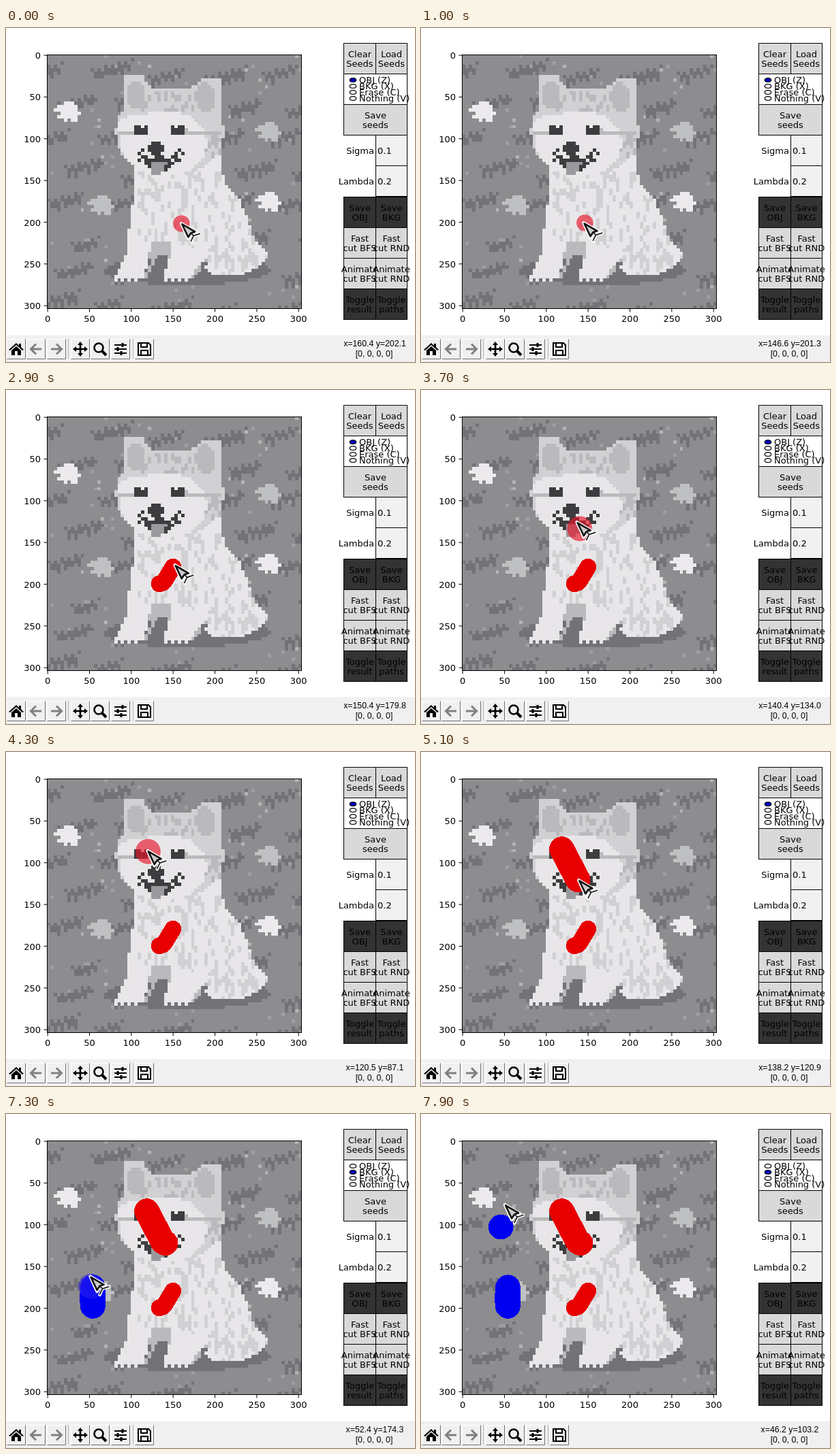
An HTML page for the animation above (8000 ms loop, 600 px wide and 491 px high).

```html
<!DOCTYPE html>
<html lang="en">
<head>
<meta charset="utf-8">
<title>Seed painting</title>
<style>
  html, body { margin: 0; width: 100%; height: 100%; overflow: hidden; background: #fff; }
  svg { display: block; }
  text { font: 13px "DejaVu Sans", sans-serif; }
  .status { font: 12.3px "Liberation Sans", Arial, sans-serif; text-anchor: middle; }
</style>
</head>
<body>
<svg width="600" height="491" viewBox="0 0 600 491">
  <g id="picture" shape-rendering="crispEdges"></g>
  <g id="strokes" fill="none" stroke-linecap="round" stroke-linejoin="round" shape-rendering="crispEdges"></g>
  <circle id="brush"/>
  <g id="axes"></g>
  <g id="panel"></g>
  <g id="toolbar"></g>
  <text class="status" id="coords" x="541" y="468"></text>
  <text class="status" x="540" y="483">[0, 0, 0, 0]</text>
  <g id="cursor" stroke-linejoin="round" stroke-linecap="round">
    <path d="M0 0L10 22L14 15L22 13ZM14 15L18 18L27 15M18 18L14 27" fill="#fff" stroke="#fff" stroke-width="4.6"/>
    <path d="M1 1L10 20L14 14L20 12Z" fill="#ccc" stroke="#111" stroke-width="2.6"/>
    <path d="M14 14L18 18L27 15M18 18L14 26" fill="none" stroke="#222" stroke-width="1.8"/>
  </g>
</svg>
<script>
const $ = id => document.getElementById(id);
const LEFT = 60.5, TOP = 39.5, SIZE = 373, SCALE = SIZE / 304, CELLS = 76, CELL = SIZE / CELLS;
const toX = x => LEFT + x * SCALE, toY = y => TOP + y * SCALE;
const random = n => { const v = Math.sin(n * 12.9898 + 4.1) * 43758.5453; return v - Math.floor(v); };

// ---- Pixel picture -------------------------------------------------------
const GROUND = '#8d8c8f', DARK = '#737276', LIGHT = '#e8e6e8', MID = '#d1d0d2', SHADE = '#bab9bc';
const TONES = { '#': '#3d3c3f', o: '#f7f6f7', t: '#9a999c', '+': SHADE };
const grid = Array.from({ length: CELLS }, () => Array(CELLS).fill(GROUND));

function put(c, r, color) {
  if (c >= 0 && r >= 0 && c < CELLS && r < CELLS) grid[r][c] = color;
}

// Paints each cell whose centre, in stage pixels, passes the test.
function fill(color, test, density = 1) {
  for (let r = 0; r < CELLS; r++) for (let c = 0; c < CELLS; c++)
    if (test(LEFT + (c + .5) * CELL, TOP + (r + .5) * CELL) &&
        (density === 1 || random(c * 31 + Math.floor((r + c % 3) / 2) * 17) < density)) put(c, r, color);
}

const ellipse = (cx, cy, rx, ry) => (x, y) => ((x - cx) / rx) ** 2 + ((y - cy) / ry) ** 2 < 1;

function polygon(outline) {
  const points = outline.split(' ').map(p => p.split(',').map(Number));
  return (x, y) => points.reduce((hit, [ax, ay], i) => {
    const [bx, by] = points[(i + 1) % points.length];
    return (ay > y) !== (by > y) && x < (bx - ax) * (y - ay) / (by - ay) + ax ? !hit : hit;
  }, false);
}

function sprite(c0, r0, rows, tones = TONES) {
  rows.forEach((line, r) => [...line].forEach((ch, c) => {
    if (tones[ch]) put(c0 + c, r0 + r, tones[ch]);
  }));
}

// A ragged band that climbs to the right.
function band(c0, r0, length) {
  for (let i = 0; i < length; i++) {
    const end = i === 0 || i === length - 1;
    const top = r0 - Math.floor(i / 4) + i % 2;
    const height = end ? 1 : 2 + (random(c0 * 7 + r0 + i) > .5);
    for (let k = 0; k < height; k++) put(c0 + i, top + k, DARK);
  }
}

function paintBackground() {
  for (let i = 0; i < 8; i++) for (let j = 0; j < 5; j++) {
    const n = i * 5 + j;
    band(j * 17 + (i * 7) % 12 - 4, 3 + i * 10 + Math.floor(random(n) * 4), 9 + Math.floor(random(n + 60) * 5));
  }
  for (let i = 0; i < 75; i++)
    put(Math.floor(random(i) * CELLS), Math.floor(random(i + 200) * CELLS), i % 3 ? '#9f9ea1' : '#b3b2b4');
  const flower = ['...###..', '.######.', '#######.', '..######', '.######.', '...#.##.'];
  const white = { '#': '#eceaec' }, grey = { '#': '#bfc0c1' };
  sprite(2, 14, flower, white);
  sprite(62, 41, flower, white);
  sprite(62, 20, flower, grey);
  sprite(12, 42, flower, grey);
}

function paintDog() {
  fill(DARK, ellipse(265, 357, 122, 21));
  const body = polygon('187,205 312,180 320,225 342,250 366,312 386,334 370,350 346,363 300,362 285,348 276,336 181,336 181,290 190,228');
  fill(LIGHT, body);
  fill(MID, (x, y) => body(x, y) && x > 190 && y > 210, .3);
  fill(SHADE, ellipse(226, 328, 24, 14));
  fill(DARK, polygon('220,333 239,333 236,370 205,370'));
  fill(LIGHT, polygon('181,290 212,318 208,345 198,374 160,374 160,364 178,330'));
  fill(LIGHT, polygon('243,312 300,332 276,362 270,374 233,374 230,362 241,338'));
  fill(SHADE, polygon('216,335 222,335 206,366 200,368'));
  fill(SHADE, polygon('290,340 296,340 276,368 270,368'));
  fill(DARK, ellipse(290, 347, 6, 5));
  for (const paw of [21, 36]) for (let i = 0; i < 8; i += 2) put(paw + i, 67, DARK);

  fill(MID, ellipse(240, 153, 79, 66));
  fill(MID, polygon('171,69 200,69 214,92 214,135 171,135'));
  fill(MID, polygon('288,74 315,74 315,180 290,200 262,95'));
  fill(SHADE, ellipse(191, 98, 14, 21));
  fill(SHADE, ellipse(293, 102, 15, 22));
  fill(SHADE, ellipse(240, 112, 48, 20), .35);
  fill(LIGHT, ellipse(232, 170, 63, 49));
  fill(LIGHT, ellipse(195, 149, 32, 23));
  fill(LIGHT, ellipse(257, 149, 28, 22));
  fill(SHADE, (x, y) => Math.abs(y - 153) < 2.5 && Math.abs(x - 240) < 76 && Math.abs(x - 226) > 38);
  fill(SHADE, ellipse(304, 174, 11, 22), .5);
  sprite(26, 21, ['##o#', '####', '####']);
  sprite(37, 21, ['#o##.', '####+', '####+']);
  sprite(30, 26, ['.###.', '#####', '#####', '.###.']);
  sprite(27, 28, [
    '.#..........#.',
    '#.....#....#.#',
    '.##..###..##..',
    '#.########.##.',
    '..##ttttt##...',
    '...#tttt##....',
    '....tttt#.....',
    '....ttt.......',
  ]);
}

function renderGrid() {
  const runs = {};
  grid.forEach((line, r) => {
    for (let c = 0; c < CELLS;) {
      let end = c + 1;
      while (end < CELLS && line[end] === line[c]) end++;
      runs[line[c]] = (runs[line[c]] || '') + `M${c} ${r}h${end - c}v1h${c - end}z`;
      c = end;
    }
  });
  $('picture').innerHTML = `<g transform="translate(${LEFT} ${TOP}) scale(${CELL})">` +
    Object.entries(runs).map(([color, d]) => `<path fill="${color}" d="${d}"/>`).join('') + '</g>';
}

// ---- Interface -----------------------------------------------------------
const rect = (x, y, w, h, fill, stroke = '#000') =>
  `<rect x="${x}" y="${y}" width="${w}" height="${h}" fill="${fill}" stroke="${stroke}"/>`;
const label = (x, y, value, anchor = 'middle') => `<text x="${x}" y="${y}" text-anchor="${anchor}">${value}</text>`;

function drawAxes() {
  let out = rect(LEFT, TOP, SIZE, SIZE, 'none');
  for (let v = 0; v <= 300; v += 50) {
    const x = toX(v + .5), y = toY(v + .5);
    out += `<path d="M${x} 412.5v5M${LEFT} ${y}h-5" stroke="#000"/>` +
      label(x, 432, v) + label(51, y + 5, v, 'end');
  }
  $('axes').innerHTML = out;
}

function drawPanel() {
  const X = 495.5, W = 93, HALF = W / 2, rowTop = i => Math.round(23 + i * 45.1) - .5, H = 45;
  const button = (i, x, w, first, second, fill = '#d9d9d9') =>
    rect(x, rowTop(i), w, H, fill) +
    label(x + w / 2, rowTop(i) + 20, first) + label(x + w / 2, rowTop(i) + 34, second);
  const pair = (i, a, b, c, d, fill) =>
    button(i, X, HALF + .5, a, b, fill) + button(i, X + HALF + .5, HALF - .5, c, d, fill);
  const field = (i, name, value) => rect(X + HALF + .5, rowTop(i), HALF - .5, H, '#f2f1f2') +
    label(540, rowTop(i) + 27, name, 'end') + label(545, rowTop(i) + 27, value, 'start');
  const radios = ['OBJ (Z)', 'BKG (X)', 'Erase (C)', 'Nothing (V)'].map((name, i) => {
    const y = 76.5 + i * 9;
    return `<ellipse class="radio" cx="509" cy="${y}" rx="4.7" ry="2.9" stroke="#000" stroke-width="1.2"/>` +
      label(518, y + 4.5, name, 'start');
  }).join('');
  $('panel').innerHTML =
    pair(0, 'Clear', 'Seeds', 'Load', 'Seeds') +
    rect(X, rowTop(1), W, H, '#fff') + radios +
    button(2, X, W, 'Save', 'seeds') +
    field(3, 'Sigma', '0.1') + field(4, 'Lambda', '0.2') +
    pair(5, 'Save', 'OBJ', 'Save', 'BKG', '#333') +
    pair(6, 'Fast', 'cut BFS', 'Fast', 'cut RND') +
    pair(7, 'Animate', 'cut BFS', 'Animate', 'cut RND') +
    pair(8, 'Toggle', 'result', 'Toggle', 'paths', '#333');
}

function drawToolbar() {
  const line = (d, color = '#000', w = 2) => `<path d="${d}" fill="none" stroke="${color}" stroke-width="${w}"/>`;
  const arrow = side => `<g transform="scale(${side} 1)">${line('M8 0H-7M0 -7.5L-7.5 0L0 7.5', '#808080', 3)}</g>`;
  const spoke = [0, 90, 180, 270].map(a => `<path transform="rotate(${a})" d="M-1.3 0V-6H-4L0 -11L4 -6H1.3V0Z"/>`);
  const icons = [
    '<path d="M-11 1L0 -9L4 -5V-8H7V-3L11 1L9 2L0 -6L-9 2ZM-7 2L0 -4L7 2V9H2V3H-2V9H-7Z"/>',
    arrow(1),
    arrow(-1),
    spoke.join(''),
    '<circle cx="-2" cy="-2" r="6.5" fill="none" stroke="#000" stroke-width="2.6"/>' + line('M3 3L9 9', '#000', 4),
    line('M-9 -6H9M-9 0H9M-9 6H9') + line('M3 -9v6M-4 -3v6M1 3v6', '#000', 3),
    line('M-9 -9H6L9 -6V9H-9Z') + line('M-5 -8V-3H4V-8M-5 9V2H5V9'),
  ];
  $('toolbar').innerHTML = '<path d="M0 451.5H600V491H0Z" fill="#f0f0f0"/>' + icons.map((icon, i) => {
    const x = 2 + Math.round(i * 29.3) + 6 * Math.floor(i / 3) - .5;
    return line(`M${x} 486.5V457.5H${x + 27}`, '#fff', 1) + line(`M${x} 486.5H${x + 27}V457.5`, '#707070', 1) +
      `<g transform="translate(${x + 13.5} 472)">${icon}</g>`;
  }).join('') + line('M91.5 457V486M186.5 457V486', '#b4b4b4', 1);
}

// ---- Motion --------------------------------------------------------------
const LOOP = 8000, STEP = 100, LAG = 100, WIDEN = 3700, SWITCH = 6000;
const RED = '#e80000', BLUE = '#0000f0';

// Pointer stops: time, then place in picture units.
const stops = [
  [0, 160.4, 202.1], [1700, 134.3, 200.5], [2100, 134, 200], [2350, 139, 198.5], [2800, 150.4, 179.8],
  [3100, 157, 173], [4200, 120.5, 87.1], [4500, 119, 84], [5000, 138.2, 120.9], [5400, 142.5, 123],
  [5900, 140, 128], [6400, 55.4, 186], [6700, 54.5, 175.5], [7000, 54.5, 198], [7800, 46.2, 103.2], [7900, 51, 76.6],
];
const strokes = [
  { color: RED, radius: 10, from: 2200, to: 2900 },
  { color: RED, radius: 15, from: 4600, to: 5400 },
  { color: BLUE, radius: 15, from: 6800, to: 7200 },
  { color: BLUE, radius: 15, from: 7900, to: 7900 },
];

function pointer(t) {
  const next = stops.findIndex(stop => stop[0] > t);
  if (t < 0 || next < 0) return stops.at(t < 0 ? 0 : -1).slice(1);
  const [t0, x0, y0] = stops[next - 1], [t1, x1, y1] = stops[next], f = (t - t0) / (t1 - t0);
  return [x0 + (x1 - x0) * f, y0 + (y1 - y0) * f];
}
const inkAt = t => pointer(t - LAG);

function strokePath({ color, radius, from, to }, t) {
  if (t < from) return '';
  const points = [];
  for (let s = from; s <= Math.min(t, to); s += STEP) {
    const [x, y] = inkAt(s);
    points.push(`${toX(x).toFixed(1)} ${toY(y).toFixed(1)}`);
  }
  return `<path d="M${points[0]}L${points.join('L')}" stroke="${color}" stroke-width="${radius * 2 * SCALE}"/>`;
}

function set(el, attrs) {
  for (const name in attrs) el.setAttribute(name, attrs[name]);
}

function draw(time) {
  const t = Math.floor((time % LOOP) / STEP) * STEP;
  const [x, y] = inkAt(t), [cx, cy] = pointer(t);
  const painting = strokes.some(s => t >= s.from && t <= s.to);
  const background = t >= SWITCH;
  $('strokes').innerHTML = strokes.map(s => strokePath(s, t)).join('');
  set($('brush'), {
    cx: toX(x), cy: toY(y), r: (t < WIDEN ? 10 : 15) * SCALE,
    fill: background ? '#281ef0' : '#e61428', opacity: painting ? 0 : background ? .6 : .65,
  });
  set($('cursor'), { transform: `translate(${toX(cx)} ${toY(cy)})` });
  radios.forEach((el, i) => set(el, { fill: i === Number(background) ? '#0000c8' : '#fff' }));
  $('coords').textContent = `x=${x.toFixed(1)} y=${y.toFixed(1)}`;
}

paintBackground();
paintDog();
renderGrid();
drawAxes();
drawPanel();
drawToolbar();
const radios = [...document.querySelectorAll('.radio')];
const start = performance.now();
function tick() {
  draw(performance.now() - start);
  requestAnimationFrame(tick);
}
tick();
</script>
</body>
</html>
```
